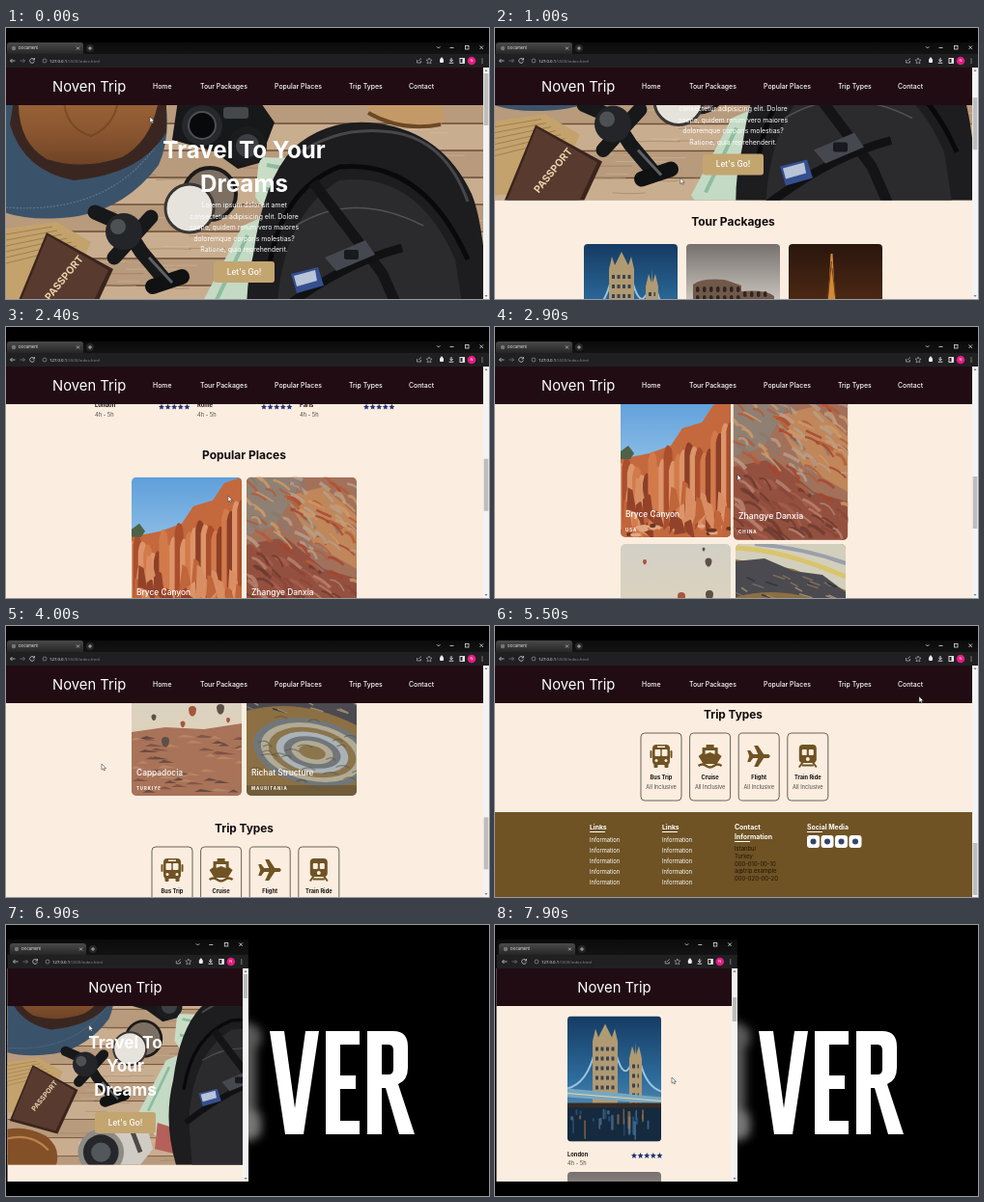
An HTML page that plays this animation: 500 px wide and 281 px high, repeating every 8 s.

```html
<!DOCTYPE html>
<html lang="en">
<head>
<meta charset="utf-8">
<style>
html, body { margin: 0; width: 100%; height: 100%; overflow: hidden; background: #000; }
svg { display: block; width: 100vw; height: 100vh; font-family: Inter, "Open Sans", sans-serif; }
</style>
</head>
<body>
<svg id="stage" viewBox="0 0 500 281" preserveAspectRatio="none"></svg>
<script>
const LOOP = 8000, STEP = 100, CUT = 5900;
const BRAND = 'Noven Trip', PEACH = '#fbeee0', NAV = '#210c14', BROWN = '#6f5324';
const NAMES = ['Bus Trip', 'Cruise', 'Flight', 'Train Ride'];

let seed = 7;
const rnd = (a, b) => {
  seed = (seed * 16807) % 2147483647;
  return +(a + (b - a) * seed / 2147483647).toFixed(1);
};
const pick = list => list[Math.floor(rnd(0, list.length - .06))];
const times = (n, fn) => Array.from({ length: n }, (_, i) => fn(i)).join('');

// Drawing helpers; text is placed by its vertical middle.
const text = (x, mid, size, str, fill = '#fff', weight = 400, anchor = 'start', more = '') =>
  `<text x="${x}" y="${mid + size * .35}" font-size="${size}" fill="${fill}" font-weight="${weight}" text-anchor="${anchor}" ${more}>${str}</text>`;
const rect = (x, y, w, h, fill, rx = 0, more = '') =>
  `<rect x="${x}" y="${y}" width="${w}" height="${h}" fill="${fill}" rx="${rx}" ${more}/>`;
const oval = (x, y, rx, ry, fill, more = '') =>
  `<ellipse cx="${x}" cy="${y}" rx="${rx}" ry="${ry}" fill="${fill}" ${more}/>`;
const dot = (x, y, r, fill, more) => oval(x, y, r, r, fill, more);
const path = (d, fill, more = '') => `<path d="${d}" fill="${fill}" ${more}/>`;
const line = (d, stroke, width = 1, more = '') =>
  `<path d="${d}" fill="none" stroke="${stroke}" stroke-width="${width}" ${more}/>`;
const group = (x, y, body, more = '') => `<g transform="translate(${x} ${y})" ${more}>${body}</g>`;
const fade = (id, ...colors) => `<linearGradient id="${id}" x2="0" y2="1">` +
  colors.map((c, i) => `<stop offset="${i / (colors.length - 1)}" stop-color="${c}"/>`).join('') + '</linearGradient>';
const use = (id, more = '') => `<use href="#${id}" ${more}/>`;
const clip = (id, x, y, w, h, rx = 0) => `<clipPath id="${id}">${rect(x, y, w, h, '#000', rx)}</clipPath>`;

const hero = () => rect(0, 70, 500, 300, '#b99673') +
  times(11, i => rect(0, 72 + i * 28, 500, 27, i % 2 ? '#c9ad8f' : '#b89a7c') + line(`M0 ${99 + i * 28}H500`, '#6b4f38', 1.3)) +
  times(130, () => line(`M${rnd(0, 490)} ${rnd(75, 360)}q20 ${rnd(-2, 2)} ${rnd(20, 55)} 0`, pick(['#8a6a4d', '#dcc4a8']), .8, 'opacity=".55"')) +
  // hat
  path('M-5 75H165Q171 112 158 142Q125 186 75 195Q25 202 -5 190Z', '#3a536a') +
  line('M0 186Q110 194 160 115', '#5d7589', 1.2, 'stroke-dasharray="2 1.5"') +
  path('M4 100Q18 148 70 158Q140 152 166 108L166 75H8Z', '#3a2620') +
  path('M13 75Q12 118 42 136Q80 148 120 134Q150 118 158 75Z', 'url(#felt)') +
  line('M60 75Q62 104 88 112Q112 102 116 75', '#6a3f22', 2, 'opacity=".6"') +
  // notebook and passport
  path('M0 208L52 201L88 222L60 281L0 285Z', '#c4a26c') +
  times(6, i => line(`M0 ${214 + i * 6}L${48 + i * 5} ${206 + i * 4}`, '#8e713f', .7)) +
  path('M42 212L111 250L80 317L7 297Z', '#3b241d') + path('M43 215L106 251L77 312L11 294Z', '#583a2f') +
  text(0, 0, 10.5, 'PASSPORT', '#e8d3aa', 700, 'middle', 'transform="translate(60 259) rotate(-51)"') +
  // tickets and camera
  path('M262 134L335 136L318 180L268 190L258 175Z', '#c9dcc6') + line('M270 142L312 150M266 166L290 172', '#8dbd9d', 4) +
  path('M245 205L268 195V340L236 330L203 285Z', '#c4dac4') + line('M250 215L218 282', '#8dbd9d', 4) + path('M232 300L270 312V350L228 340Z', '#b5605a') +
  path('M178 75H262L278 98L262 140L240 146L215 128L172 116Z', '#17181a') +
  dot(203, 101, 21, '#26282b') + dot(203, 101, 14, '#08090a', 'stroke="#4c5054" stroke-width="2"') +
  dot(250, 122, 20, '#1b1c1e') + dot(250, 122, 12, '#3b3e42') + rect(225, 82, 26, 12, '#44484b', 3) +
  // filters and tripod head
  dot(211, 172, 27, '#7c6f62', 'stroke="#1b1a1a" stroke-width="4"') +
  dot(190, 187, 25, '#e6e2dc', 'stroke="#3a3634" stroke-width="3"') +
  line('M92 191L122 204L140 232L165 262M112 238L150 196', '#17181a', 15, 'stroke-linecap="round"') +
  dot(122, 211, 19, '#232528') + dot(116, 206, 8, '#4d5154') + line('M152 268L182 258', '#101112', 16, 'stroke-linecap="round"') +
  line('M148 238L172 264', '#5d6163', 3) +
  // shoes and long lens
  path('M368 75Q382 98 420 101Q446 108 455 94L448 75Z', '#c39a67') + line('M375 88Q410 108 450 100', '#6d4826', 4) +
  path('M-5 312Q28 302 62 320Q88 340 76 370H-5Z', '#845028') + line('M0 325Q40 314 66 342', '#bb8450', 3) +
  path('M112 330L165 295L215 300L225 340L200 372H120Z', '#d0ccc4') + dot(146, 345, 35, '#8e8a84') + dot(146, 345, 27, '#26272a') + dot(146, 345, 15, '#52575c') +
  line('M188 298L206 345', '#4c4a48', 7) +
  // backpack
  path('M262 370Q240 300 256 235Q266 158 298 124Q335 92 385 99Q452 108 482 172Q500 215 502 370Z', '#1d1c1e') +
  path('M280 300Q284 195 345 158Q425 148 465 240L485 370H285Z', '#2b2a2d') +
  line('M272 250Q284 168 345 144Q432 136 478 240', '#09090a', 5) + line('M300 132Q345 100 400 108T478 180', '#47474b', 3) +
  line('M300 205Q360 168 432 205', '#515156', 1.5) + line('M318 160L390 255L440 370', '#141416', 11) +
  line('M275 300Q345 245 410 228', '#111113', 9) + path('M330 238L372 220L382 235L342 252Z', '#45484e') + rect(350, 230, 15, 10, '#181a1d', 2) +
  path('M295 255L323 248L329 267L301 275Z', '#34508f') + path('M298 257L320 251L322 262L301 268Z', '#b9c4d8');

const art = {
  london: () => rect(0, 0, 97, 130, 'url(#night)') +
    line('M0 75Q20 70 28 38M50 38Q58 68 66 50M76 50Q82 73 97 78', '#9ac4dd', 2) +
    [[26, 26, 12], [64, 13, 30]].map(([x, w, y]) => path(`M${x} 94V${y + 14}l3-13 3 9 ${w / 2 - 6} -14 ${w / 2 - 6} 14 3-9 3 13V94Z`, '#b09a72') +
      times(5, i => line(`M${x + 3} ${y + 22 + i * 10}h${w - 6}`, '#3b4250', 4, 'stroke-dasharray="3 2.5"'))).join('') +
    path('M0 75L97 84V91L0 84Z', '#75a7c4') + line('M0 80L97 88', '#e8d5a0', 1.2) +
    rect(0, 94, 97, 36, '#15293f') + rect(0, 90, 97, 5, '#352c27') +
    times(28, () => rect(rnd(0, 94), rnd(96, 110), rnd(1, 3), rnd(4, 20), pick(['#315c8a', '#a57745', '#577fa2']), 1, 'opacity=".65"')),
  rome: () => rect(0, 0, 97, 130, 'url(#cloud)') +
    path('M7 70V42Q16 35 40 37L57 43V49Q82 47 91 54V70Z', '#71594a') +
    times(3, r => times(11, i => rect(10 + i * 7, 44 + r * 9 + (i > 6 ? 5 : 0), 3.5, 6, '#30251f', 1.7))) +
    rect(0, 68, 97, 62, '#675c54') +
    times(60, () => oval(rnd(0, 97), rnd(72, 128), rnd(3, 7), rnd(1, 2.2), pick(['#4a413c', '#81766d', '#352f2c']))) +
    path('M2 88Q35 74 65 92Q84 106 60 119Q20 128 5 110Z', '#a0978d') + path('M5 91Q35 82 60 94L66 105Q34 112 8 105Z', '#3b302a'),
  paris: () => rect(0, 0, 97, 130, 'url(#dusk)') +
    path('M43.5 10H45.5L48 55L53 76L66 103H55Q45 85 34 103H23L36 76L41 55Z', '#d18a36') +
    line('M36 76H53M30 88H60M40 58H49', '#ffe09a', 2) + line('M44.5 18L38 77M45 25L51 76M40 65L50 74M49 65L38 74M34 80L28 98M55 80L62 98', '#6d3b16', 1) +
    rect(0, 100, 97, 30, '#252338') + rect(0, 97, 97, 5, '#3f2a19') +
    times(34, () => rect(rnd(0, 94), rnd(102, 122), rnd(2, 7), 1.5, pick(['#b44c6c', '#c58a49', '#455b94']))),
  bryce: () => rect(0, 0, 114, 143, 'url(#noon)') + path('M0 62L30 56L52 48L64 30L84 24L96 6L114 0V143H0Z', '#c4683d') +
    times(22, i => { const x = i * 5.4 - 4, y = 72 - i * 1.9 + rnd(-10, 16);
      return path(`M${x} 136V${y + 10}q2-10 4-10q5 1 5 10l2 ${rnd(40, 70)}Z`, pick(['#d27a4a', '#a94f2e', '#dc9468', '#8c3f27'])); }) +
    times(26, () => path(`M${rnd(-4, 108)} ${rnd(110, 143)}l${rnd(1, 4)} ${rnd(-36, -12)}l5 3l4 ${rnd(10, 32)}Z`, pick(['#93422a', '#c1653b', '#d98d63']))) +
    path('M0 54L8 48L14 56L10 62H0Z', '#4f6146') + times(14, () => oval(rnd(0, 114), rnd(130, 142), rnd(2, 6), 2, pick(['#6a3524', '#e0a682']))),
  danxia: () => rect(0, 0, 114, 143, '#a3705a') + path('M0 0H60L30 50L0 60Z', '#8f8074') +
    path('M40 20L80 10L114 40V95L70 70Z', '#c0875a') + path('M0 70L40 62L80 95L114 105V143H0Z', '#93503f') +
    times(150, () => { const x = rnd(-8, 108), y = rnd(-5, 140);
      const tones = y > 65 + x * .4 ? ['#8a4636', '#a9604b', '#b98471', '#6d3a30'] : ['#b65a38', '#cf9a68', '#8b7a6e', '#b7a08c', '#a8442e'];
      return line(`M${x} ${y}q${rnd(4, 9)} ${rnd(-3, 4)} ${rnd(9, 18)} ${rnd(6, 14)}`, pick(tones), rnd(1.5, 4), 'opacity=".8"'); }),
  cappadocia: () => rect(0, 0, 114, 143, 'url(#haze)') + path('M0 77L35 72L75 74L114 68V143H0Z', '#a87359') +
    times(50, () => path(`M${rnd(-5, 110)} ${rnd(82, 140)}l6-3l${rnd(5, 16)} 3Z`, pick(['#7a4e40', '#bf8a69', '#5c433a']), 'opacity=".8"')) +
    [[91, 18, 3.5], [25, 18, 2], [86, 5, 1.5], [63, 54, 4], [92, 52, 4], [53, 68, 2.5], [23, 61, 2.5], [100, 64, 2], [35, 86, 4]]
      .map(([x, y, r], i) => path(`M${x - r} ${y}a${r} ${r} 0 0 1 ${2 * r} 0q0 ${r}-${r * .7} ${r * 1.6}h-${r * .6}q-${r * .7}-${r * .6}-${r * .7}-${r * 1.6}Z`, i % 2 ? '#a6563d' : '#5d5047')).join(''),
  richat: () => rect(0, 0, 114, 143, '#8c7043') + path('M0 0H114V48L60 26L0 16Z', '#d3cfbd') +
    line('M0 4Q50 6 114 34', '#d9c56c', 5) + line('M20 0Q70 4 114 20', '#9aa0aa', 4) +
    path('M0 18L30 15L60 28L90 32L114 50V70Q55 40 0 55Z', '#4b4a50') +
    times(20, () => line(`M${rnd(0, 100)} ${rnd(32, 54)}l${rnd(6, 14)} 4`, pick(['#7a6c5c', '#33343c', '#9a8a70']), 1.5)) +
    times(7, i => oval(68, 98, 62 - i * 8, 34 - i * 4.5, ['#71767a', '#b1aa94', '#8b754d', '#a9b3b7'][i % 4], 'transform="rotate(12 68 98)"')) +
    times(24, () => line(`M${rnd(0, 110)} ${rnd(60, 138)}q8-4 ${rnd(8, 18)} 1`, '#5a553f', 1.2, 'opacity=".6"')) + rect(0, 132, 114, 11, '#665437', 0, 'opacity=".7"')
};

const star = (x, paint = 'fill="#243379"') =>
  `<path d="M${x} -3l.9 2 2.1.2-1.6 1.5.5 2.2-1.9-1.1-1.9 1.1.5-2.2-1.6-1.5 2.1-.2Z" ${paint}/>`;
const tour = (id, city, x, y) => group(x, y,
  `<g id="${id}">${use(id.split('-')[0] + 'Art', 'clip-path="url(#tourClip)"')}</g>` +
  text(0, 143, 5.8, city, '#17110f', 700) + text(0, 153, 5.7, '4h - 5h', '#4d4743') +
  group(69, 144.5, times(5, i => star(i * 6.6))));
const place = (id, name, land, x, y) => group(x, y, `<g id="${id}">` +
  use(id + 'Art', 'clip-path="url(#placeClip)"') + text(5, 119, 8.4, name, '#fff', 500) +
  text(5, 135, 4.3, land, '#fff', 700, 'start', 'letter-spacing="1"') + '</g>');

// Trip icons sit in a box of 24 by 24 around the origin.
const icons = [
  rect(-9, -12, 18, 21, BROWN, 4) + rect(-6.5, -7, 5.8, 7, PEACH, 1) + rect(.7, -7, 5.8, 7, PEACH, 1) + rect(-4, -10.5, 8, 1.5, PEACH) +
    rect(-11.5, -6, 2, 8, BROWN, 1) + rect(9.5, -6, 2, 8, BROWN, 1) + rect(-7.5, 7, 4, 5, BROWN, 1) + rect(3.5, 7, 4, 5, BROWN, 1) + dot(-5, 4.5, 1.5, PEACH) + dot(5, 4.5, 1.5, PEACH),
  path('M-4 -12H4V-9H8V-3L12 0L7 8H-7L-12 0L-8 -3V-9H-4Z', BROWN) + path('M-5 -6H5V-2L0 -4L-5 -2Z', PEACH) + line('M-12 10q4-3 8 0t8 0t8 0', BROWN, 2.4),
  path('M-12 -6H-9L-6 -2H-1L-5 -11H-1L5 -2H10Q13 0 10 2H5L-1 11H-5L-1 2H-6L-9 6H-12L-10 0Z', BROWN),
  rect(-9, -12, 18, 19, BROWN, 4) + rect(-6, -7, 5, 6, PEACH, 1) + rect(1, -7, 5, 6, PEACH, 1) + dot(0, 3, 2, PEACH) + line('M-5 6L-9 11.5M5 6L9 11.5M-6 9.5H6', BROWN, 2)
];
const trip = (name, i) => group(151 + i * 50.6, 899, rect(0, 0, 42, 70, 'none', 4, 'stroke="#473e38" stroke-width=".8"') +
  group(21, 24, icons[i]) + text(21, 46, 5.7, name, '#17110f', 700, 'middle') + text(21, 56.5, 5.6, 'All Inclusive', '#4d4743', 400, 'middle'));

const rule = (x, y) => rect(x, y, 16, 1, '#fff');
const footer = () => rect(0, 981, 494, 90, BROWN) +
  [98, 173].map(x => text(x, 997, 6.8, 'Links', '#fff', 700) + rule(x, 1001) +
    times(5, i => text(x, 1009.5 + i * 11, 5.8, 'Information'))).join('') +
  text(248, 997, 6.9, 'Contact', '#fff', 700) + text(248, 1007, 6.9, 'Information', '#fff', 700) + rule(248, 1011) +
  ['Istanbul', 'Turkey', '000-010-00-10', 'a@trip.example', '000-020-00-20'].map((s, i) => text(248, 1019 + i * 7.8, 5.9, s, '#20150a')).join('') +
  text(323, 997, 6.9, 'Social Media', '#fff', 700) + rule(323, 1001) +
  times(4, i => rect(323 + i * 14.5, 1005, 13, 13, '#fff', 3) + dot(329.5 + i * 14.5, 1011.5, 3, '#33456b'));

const button = (x, y) => rect(x, y, 63, 22, '#c3a570', 3) + text(x + 31.5, y + 11, 8.3, "Let's Go!", '#fff', 500, 'middle');

// Browser frame: left parts move by (dx, dy), right parts hang on the right edge.
const browser = (dx, dy, right) => rect(dx && 1.5, 15, right - (dx && 1.5), 14 + dy, 'url(#bar)') +
  rect(dx && 1.5, 27 + dy, right - (dx && 1.5), 14, '#202022') +
  group(dx, dy, path('M1 27V18Q1 15 4 15H77Q80 15 80 18V27Z', 'url(#tab)') + dot(8, 21, 2.2, '#777') +
    text(13, 21, 4.1, 'Document', '#eee') + line('M73 19.5l3 3m0-3l-3 3', '#ccc', .7) +
    dot(87, 21, 4, '#262626') + line('M85 21h4m-2-2v4', '#ddd', .7) +
    line('M9.5 34H4.5m2-2l-2 2l2 2', '#ccc', .8) + line('M14.5 34h5m-2-2l2 2l-2 2', '#777', .8) +
    line('M29 32.5a2.4 2.4 0 1 0 .4 2M29.5 31v2h-2', '#ccc', .8) + dot(40, 34, 2, 'none', 'stroke="#aaa" stroke-width=".6"') +
    text(45, 34, 4.3, '127.0.0.1<tspan fill="#8b8b8b">:5500/index.html</tspan>', '#fff', 400, 'start', 'font-family="Open Sans, sans-serif"')) +
  group(right - 500, 0, line('M446 19.3l1.7 1.7l1.7-1.7M459.5 20.5h4M490.5 18.5l3.5 3.5m0-3.5l-3.5 3.5', '#ddd', .8) + rect(475.5, 18.5, 3.5, 3.5, 'none', 0, 'stroke="#ddd" stroke-width=".8"')) +
  group(right - 500, dy, line('M425.5 33v3h4v-2M427 34l3-2.5', '#bbb', .7) + group(438, 34, star(0, 'fill="none" stroke="#bbb" stroke-width=".6"')) +
    rect(449, 32, 4, 4, '#eee', 1) + dot(451, 31.8, 1.2, '#eee') + line('M461 31v3.5m-1.7-1.5l1.7 1.7l1.7-1.7M458.7 36.2h4.6', '#eee', .9) +
    rect(470, 31.5, 4.5, 5, 'none', 0, 'stroke="#eee" stroke-width=".9"') + rect(472.5, 32, 2, 4, '#eee') +
    dot(482, 34, 4.3, '#e61b80') + text(482, 34, 4, 'N', '#fff', 400, 'middle') + times(3, i => dot(493, 32 + i * 2, .6, '#ddd')));
const scrollbar = (x, y, bottom, id, size) => rect(x, y, 6, bottom - y, '#f3f3f3') +
  path(`M${x + 1.5} ${y + 4}l1.5-2l1.5 2ZM${x + 1.5} ${bottom - 4}l1.5 2l1.5-2Z`, '#777') + rect(x + .7, 0, 4.6, size, '#bdbdbd', 0, `id="${id}"`);

const desktop = () => rect(0, 41, 500, 240, PEACH) + '<g clip-path="url(#wideView)"><g id="widePage">' +
  `<g clip-path="url(#wideHero)">${use('hero')}</g>` +
  text(246.5, 127, 24.2, 'Travel To Your', '#fff', 700, 'middle') + text(246.5, 161.5, 24.2, 'Dreams', '#fff', 700, 'middle') +
  ['Lorem ipsum dolor sit amet', 'consectetur adipisicing elit. Dolore', 'saepe, quidem rerum vero maiores', 'doloremque corporis molestias?', 'Ratione, quia reprehenderit.']
    .map((s, i) => text(246.5, 184 + i * 11.4, 6.9, s, '#fff', 400, 'middle')).join('') + button(215, 242) +
  text(246.5, 312, 12, 'Tour Packages', '#120b0c', 700, 'middle') +
  tour('london-wide', 'London', 92, 335.5) + tour('rome-wide', 'Rome', 198, 335.5) + tour('paris-wide', 'Paris', 304, 335.5) +
  text(246.5, 530, 12, 'Popular Places', '#120b0c', 700, 'middle') +
  place('bryce', 'Bryce Canyon', 'USA', 130, 553) + place('cappadocia', 'Cappadocia', 'TURKIYE', 130, 703) +
  place('richat', 'Richat Structure', 'MAURITANIA', 249, 703) + place('danxia', 'Zhangye Danxia', 'CHINA', 249, 553) +
  text(246.5, 880, 11.8, 'Trip Types', '#120b0c', 700, 'middle') + NAMES.map(trip).join('') + footer() + '</g></g>' +
  rect(0, 41, 494, 39, NAV) + text(48, 60.5, 14.8, BRAND) +
  [['Home', 152], ['Tour Packages', 201], ['Popular Places', 278], ['Trip Types', 355], ['Contact', 417]].map(([s, x]) => text(x, 60.5, 6.9, s, '#fff', 500)).join('') +
  scrollbar(494, 41, 281, 'wideThumb', 54) + browser(0, 0, 500);

const lettering = 'M273 110H288L299 190L310 110H324L308 217H289Z' +
  'M331 110H366V124H346V156H362V170H346V203H366V217H331Z' +
  'M374 110H401Q416 110 416 126V148Q416 161 406 165L423 217H407L393 169H389V217H374ZM389 124V155H396Q401 155 401 149V130Q401 124 396 124Z';
const mobile = () => rect(0, 0, 500, 281, '#000') +
  `<g filter="url(#soft)">${rect(225, 100, 34, 125, '#5a5a5a', 12)}${rect(240, 192, 24, 30, '#777', 9)}${rect(240, 104, 24, 24, '#5a5a5a', 9)}</g>` +
  path(lettering, '#fff', 'fill-rule="evenodd"') + rect(1.5, 45, 249.5, 221, PEACH) +
  '<g clip-path="url(#slimView)"><g id="slimPage">' +
  `<g clip-path="url(#slimHero)">${use('hero', 'transform="translate(-1 1) scale(.68)"')}</g>` +
  ['Travel To', 'Your', 'Dreams'].map((s, i) => text(123.5, 122 + i * 24.3, 17.2, s, '#fff', 700, 'middle')).join('') + button(92, 194) +
  text(123.5, 283, 12, 'Tour Packages', '#120b0c', 700, 'middle') +
  tour('london-slim', 'London', 75, 306.5) + tour('rome-slim', 'Rome', 75, 468) + '</g></g>' +
  rect(1.5, 45, 243.5, 39, NAV) + text(123.5, 65, 14.8, BRAND, '#fff', 400, 'middle') +
  scrollbar(245, 45, 266, 'slimThumb', 25) + browser(3, 4, 250.8);

const stage = document.getElementById('stage');
stage.innerHTML = '<defs>' + fade('night', '#153b62', '#2d6c9d', '#7ba6bd') + fade('cloud', '#77716e', '#d3cdc6', '#a39a92') +
  fade('dusk', '#2a160d', '#4f2a14', '#844315') + fade('haze', '#d2d0c6', '#ded2bd', '#c2a58e') + fade('noon', '#5f9fdb', '#8fc0e6', '#b9d8ec') +
  fade('felt', '#9a6337', '#8a5630', '#6f4326') + fade('bar', '#0b0b0b', '#141414') + fade('tab', '#4a4a4a', '#262627') +
  '<filter id="soft" x="-100%" width="300%"><feGaussianBlur stdDeviation="5"/></filter>' +
  clip('wideView', 0, 41, 494, 240) + clip('slimView', 1.5, 45, 243.5, 221) + clip('wideHero', 0, 80, 494, 210) + clip('slimHero', 1.5, 84, 243.5, 164.5) +
  clip('tourClip', 0, 0, 97, 130, 4) + clip('placeClip', 0, 0, 114, 143, 5) +
  `<g id="hero">${hero()}</g>` + Object.entries(art).map(([id, draw]) => `<g id="${id}Art">${draw()}</g>`).join('') + '</defs>' +
  `<g id="wide">${desktop()}</g><g id="slim">${mobile()}</g>` +
  path('M0 0V6.2L1.5 4.9L2.5 7L3.5 6.5L2.6 4.5H4.5Z', '#fff', 'id="pointer" stroke="#222" stroke-width=".5"');

const el = id => document.getElementById(id);
const move = (id, x, y, more = '') => el(id).setAttribute('transform', `translate(${x} ${y}) ${more}`);

// Eased value along [time, value] keys.
function track(t, keys) {
  const i = keys.findIndex(k => k[0] > t);
  if (i < 0) return keys[keys.length - 1][1];
  if (!i) return keys[0][1];
  const [t0, a] = keys[i - 1], [t1, b] = keys[i], u = (t - t0) / (t1 - t0);
  return a + (b - a) * u * u * (3 - 2 * u);
}
const scrollKeys = [[500, 0], [1500, 223], [1900, 223], [2700, 478], [3000, 478], [3800, 670], [4100, 670], [4500, 788]];
const slimKeys = [[7000, 0], [7800, 212]];
const pointerKeys = [[400, 149, 92], [1400, 215, 190], [1800, 202, 204], [2900, 251, 153], [3900, 99, 143], [4500, 99, 143],
  [5400, 439, 73], [CUT - 1, 439, 73], [CUT, 200, 60], [6800, 83, 102], [7800, 183, 158]];

function hover(id, w, h, size, amount) {
  const s = 1 + (size - 1) * amount;
  move(id, w / 2 * (1 - s), h / 2 * (1 - s), `scale(${s})`);
}

function render(time) {
  const t = Math.floor(time % LOOP / STEP) * STEP, wide = t < CUT;
  el('wide').style.display = wide ? '' : 'none';
  el('slim').style.display = wide ? 'none' : '';
  const y = track(t, scrollKeys), slimY = track(t, slimKeys);
  move('widePage', 0, -y);
  move('wideThumb', 0, 47 + y * 178 / 788);
  move('slimPage', 0, -slimY);
  move('slimThumb', 0, 51 + slimY * 24 / 212);
  hover('rome-wide', 97, 130, 1.055, track(t, [[1400, 0], [1700, 1], [2000, 1], [2200, 0]]));
  hover('danxia', 114, 143, 1.04, track(t, [[2500, 0], [2800, 1], [3100, 1], [3300, 0]]));
  move('pointer', track(t, pointerKeys), track(t, pointerKeys.map(k => [k[0], k[2]])));
}

const start = performance.now();
function tick() {
  render(performance.now() - start);
  requestAnimationFrame(tick);
}
tick();
</script>
</body>
</html>
```
